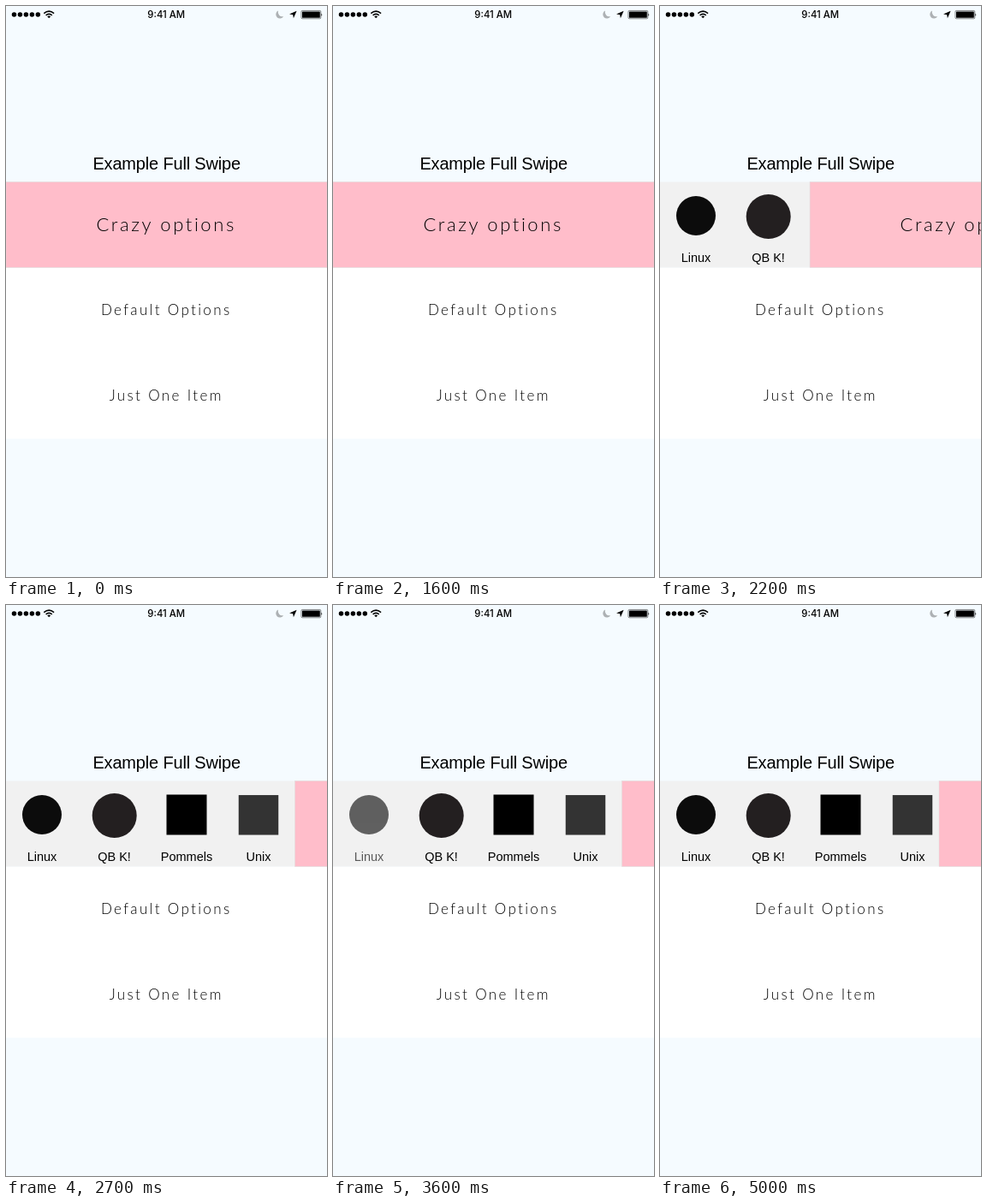
Animation, 375 px wide and 667 px high, one loop 5.1 s. Source, as an HTML page:

```html
<!DOCTYPE html>
<html lang="en">
<head>
<meta charset="utf-8">
<title>Swipe options</title>
<style>
  html, body { margin: 0; width: 100%; height: 100%; overflow: hidden; background: #f5fbff; }
  svg { display: block; width: 375px; height: 667px; }
  text { text-anchor: middle; font-family: "Liberation Sans", Arial, sans-serif; }
  .row { font: 300 17px Lato, sans-serif; letter-spacing: 2.35px; }
  .big { font-size: 22px; letter-spacing: 2.6px; }
  .title { font-size: 20px; letter-spacing: -.17px; }
  .clock { font: 500 11.3px Inter, sans-serif; }
  .label { font-size: 14.5px; }
</style>
</head>
<body>
<svg viewBox="0 0 375 667">
  <rect width="375" height="667" fill="#f5fbff"/>

  <g id="status">
    <g id="signal"></g>
    <g fill="none" stroke="#000" stroke-width="1.5">
      <path d="M44.3 8.6Q50.2 3.6 56.1 8.6"/>
      <path d="M46.6 10.9Q50.2 7.8 53.8 10.9"/>
    </g>
    <path d="M48.2 12.2Q50.2 10.6 52.2 12.2L50.2 14.2Z"/>
    <text class="clock" x="187.2" y="14">9:41 AM</text>
    <path d="M318 5.6A4.7 4.7 0 1 0 324.2 11.9A4.9 4.9 0 0 1 318 5.6Z" fill="#adb1b4"/>
    <path d="M339.6 5.8L335.9 14.2L335.2 10.3L331 9.6Z"/>
    <rect x="345" y="5.4" width="22.8" height="9.4" rx="1.3" fill="none" stroke="#000" stroke-width=".5"/>
    <rect x="346" y="6.4" width="20.8" height="7.4" rx=".5"/>
    <path d="M368.4 8.4Q370.2 10.2 368.4 12Z"/>
  </g>

  <text class="title" x="187.7" y="191">Example Full Swipe</text>
  <rect y="305.5" width="375" height="200" fill="#fff"/>
  <text class="row" x="187.2" y="361">Default Options</text>
  <text class="row" x="187.2" y="461">Just One Item</text>

  <rect y="205.5" width="375" height="100" fill="#f1f1f1"/>
  <g id="options"></g>

  <g id="cover">
    <rect id="pink" y="205.5" width="375" height="100" stroke="#ddd" stroke-width=".5"/>
    <text class="row big" x="187.2" y="263">Crazy options</text>
  </g>
</svg>
<script>
const LOOP = 5100, STEP = 100, OPEN = 337.5;
const $ = id => document.getElementById(id);

const circle = (x, y, r, fill) => `<circle cx="${x}" cy="${y}" r="${r}" fill="${fill}"/>`;
const square = (x, y, size, fill) =>
  `<rect x="${x - size / 2}" y="${y - size / 2}" width="${size}" height="${size}" fill="${fill}"/>`;

// an item is dimmed from down to up
const items = [
  { name: 'Linux',   x: 42,    icon: circle(42, 245, 23, '#0c0c0c'),   down: 3500, up: 3800 },
  { name: 'QB K!',   x: 126.5, icon: circle(126.7, 246, 26, '#231f20'), down: 4200, up: 4400 },
  { name: 'Pommels', x: 211,   icon: square(211, 245, 47, '#000'),     down: 3300, up: 3400 },
  { name: 'Unix',    x: 295,   icon: square(295, 245.3, 46.5, '#333'), down: 2900, up: 3200 }
];

$('signal').innerHTML = [0, 1, 2, 3, 4].map(i => circle(9.5 + i * 6.95, 10.1, 2.75, '#000')).join('');
$('options').innerHTML = items.map(o =>
  `<g>${o.icon}<text class="label" x="${o.x}" y="299">${o.name}</text></g>`).join('');
const groups = [...$('options').children];

const clamp = v => Math.min(1, Math.max(0, v));
const easeInOut = p => p < .5 ? 4 * p ** 3 : 1 - 4 * (1 - p) ** 3;

function offset(t) {
  const opened = OPEN * easeInOut(clamp((t - 2000) / 395));
  const pull = clamp((t - 4700) / 300);
  return opened - 11.5 * pull * pull;
}

function draw(t) {
  $('cover').setAttribute('transform', `translate(${offset(t).toFixed(2)} 0)`);
  $('pink').setAttribute('fill', t >= 2000 && t < 2400 ? '#ffc1cc' : '#ffbdca');
  groups.forEach((g, i) => {
    const { down, up } = items[i];
    g.setAttribute('opacity', t >= down && t < up ? .63 : 1);
  });
}

const start = performance.now();
function tick() {
  const t = (performance.now() - start) % LOOP;
  draw(Math.floor(t / STEP) * STEP);
  requestAnimationFrame(tick);
}
tick();
</script>
</body>
</html>
```
